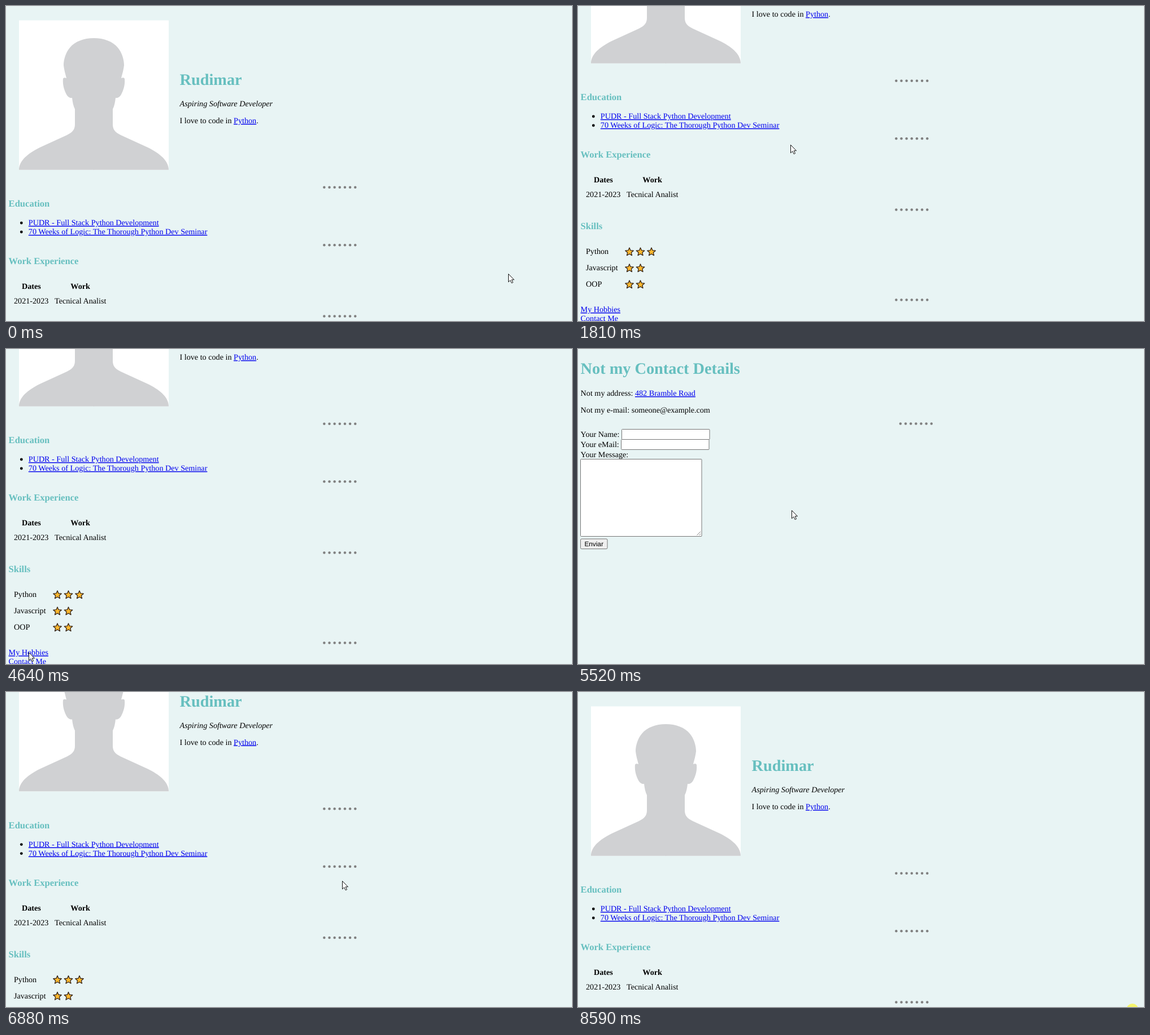
These frames come from a looping animation (1002 by 559 pixels, 8650 ms). An HTML page:

```html
<!DOCTYPE html>
<html lang="en">
<head>
<meta charset="utf-8">
<title>Personal site</title>
<style>
  html, body { margin: 0; width: 100%; height: 100%; overflow: hidden; background: #e8f4f4; }
  svg { display: block; width: 1002px; height: 559px; }
  text { font: 14.16px "Liberation Serif", "Times New Roman", serif; text-rendering: geometricPrecision; white-space: pre; }
  .h1 { font-size: 28.32px; font-weight: bold; fill: #66bfbf; }
  .h3 { font-size: 16.57px; font-weight: bold; fill: #66bfbf; }
  .b { font-weight: bold; }
  .i { font-style: italic; }
  .a { fill: #00e; text-decoration: underline; text-decoration-thickness: 1px; text-underline-offset: 1px; }
  .btn { font: 11.8px "Liberation Sans", Arial, sans-serif; }
  .field { fill: #fff; stroke: #767676; }
</style>
</head>
<body>
<svg viewBox="0 0 1002 559">
  <g id="home">
    <rect x="23" y="25.5" width="265" height="265.3" fill="#fff"/>
    <path id="half" fill="#d0d1d3" d="M156 57C137 57 122 63 113 74C106 82 102 95 102 105C103 114 105 120 107 128
      Q102 126 101 129C100 140 103 149 107 157Q111 164 117 163C118 171 119 177 122 183V210
      C122 219 118 224 108 229L60 251C38 262 23 275 23 290.7H156Z"/>
    <use href="#half" transform="matrix(-1 0 0 1 311 0)"/>
  </g>
  <g id="hobbies"></g>
  <g id="contact"></g>
  <circle id="mark" cx="981.5" cy="563.5" r="10.5" fill="#f6f66e"/>
  <path id="cursor" fill="#fff" stroke="#111" d="M.5 .5V14.8L3.8 11.7L6.2 16.7L8.5 15.6L6.2 10.8H10.5Z"/>
</svg>
<script>
const NS = "http://www.w3.org/2000/svg";
const $ = id => document.getElementById(id);
const pages = { home: $("home"), hobbies: $("hobbies"), contact: $("contact") };
const LEFT = 4.6, INDENT = 39.8, LINE = 16;

function add(parent, tag, attrs, text) {
  const el = document.createElementNS(NS, tag);
  for (const k in attrs) el.setAttribute(k, attrs[k]);
  if (text) el.textContent = text;
  parent.appendChild(el);
  return el;
}
const write = (page, x, y, text, cls = "") => add(page, "text", { x, y, class: cls }, text);
const span = (line, text, cls = "") => add(line, "tspan", { class: cls }, text);
const dot = (page, cx, cy, r, fill) => add(page, "circle", { cx, cy, r, fill });

function rule(page, cx, y) {
  for (let i = -3; i <= 3; i++) dot(page, cx + i * 9.15, y, 2.25, "#808080");
}

function star(page, cx, cy) {
  const pts = [];
  for (let i = 0; i < 10; i++) {
    const r = i % 2 ? 3.5 : 7.6, a = i * Math.PI / 5;
    pts.push(`${cx + r * Math.sin(a)},${cy + .5 - r * Math.cos(a)}`);
  }
  add(page, "polygon", { points: pts.join(" "), fill: "#ffb92e", stroke: "#33241a",
    "stroke-width": 1.3, "stroke-linejoin": "round" });
}

function buildHome(p) {
  write(p, 307.5, 140, "Rudimar", "h1");
  write(p, 307.5, 178, "Aspiring Software Developer", "i");
  const intro = write(p, 307.5, 208, "I love to code in ");
  span(intro, "Python", "a");
  span(intro, ".");
  [321.7, 424.3, 550.5, 710.5].forEach(y => rule(p, 590.8, y));

  write(p, LEFT, 356, "Education", "h3");
  ["PUDR - Full Stack Python Development",
   "70 Weeks of Logic: The Thorough Python Dev Seminar"].forEach((s, i) => {
    dot(p, 27.3, 385 + i * LINE, 2.4, "#000");
    write(p, INDENT, 389 + i * LINE, s, "a");
  });

  write(p, LEFT, 458, "Work Experience", "h3");
  write(p, 28, 502, "Dates", "b");
  write(p, 114.3, 502, "Work", "b");
  write(p, 14, 528, "2021-2023");
  write(p, 86, 528, "Tecnical Analist");

  write(p, LEFT, 585, "Skills", "h3");
  [["Python", 3], ["Javascript", 2], ["OOP", 2]].forEach(([name, n], row) => {
    const y = 625 + row * 29;
    write(p, 14, y + 4, name);
    for (let i = 0; i < n; i++) star(p, 91 + i * 19.5, y);
  });
  ["My Hobbies", "Contact Me"].forEach((s, i) => write(p, LEFT, 732 + i * LINE, s, "a"));
}

function buildHobbies(p) {
  write(p, LEFT, 32, "My Hobbies", "h3");
  ["Reading", "Study", "Games", "Series"].forEach((s, i) =>
    write(p, 25.7, 65 + i * LINE, `${i + 1}. ${s}`));
}

function buildContact(p) {
  const box = (x, y, width, height, extra) =>
    add(p, "rect", { x, y, width, height, rx: 1, class: "field", ...extra });
  write(p, LEFT, 44, "Not my Contact Details", "h1");
  span(write(p, LEFT, 83, "Not my address: "), "482 Bramble Road", "a");
  write(p, LEFT, 113, "Not my e-mail: someone@example.com");
  rule(p, 598.3, 132.5);
  ["Your Name:", "Your eMail:", "Your Message:"].forEach((s, i) => {
    write(p, LEFT, 156 + i * 18, s);
    if (i < 2) box(77.5 - i, 142.5 + i * 18, 155.5, 18);
  });
  box(4.5, 195.5, 214.5, 137);
  add(p, "path", { d: "M210.5 330.5L217 324M214.5 330.5L217 328", stroke: "#777", "stroke-width": .9 });
  box(4.5, 337, 47.5, 17.7, { rx: 2, style: "fill:#efefef" });
  write(p, 11.4, 350, "Enviar", "btn");
}

buildHome(pages.home);
buildHobbies(pages.hobbies);
buildContact(pages.contact);

const LOOP = 8650, FRAME = LOOP / 130, FLICK = 200;

function ease(u) {
  u = Math.min(Math.max(u, 0), 1);
  return u * u * (3 - 2 * u);
}

// Wheel flicks: start, distance
const flicks = [[890, 88.5], [1596, 100.5], [6764, -177], [7190, -12]];
const scrollAt = t => flicks.reduce((y, [start, d]) => y + d * ease((t - start) / FLICK), 0);

// Pointer glides: start, end, destination
const rest = [889, 475], back = [30, -30], links = [40, 538];
const glides = [
  [60, 270, [389, 237]],
  [900, 995, [384, 242]],
  [1640, 1790, [376, 246]],
  [1860, 2340, links],
  [2560, 3330, [244, 386]],
  [3380, 3525, [255, 313]],
  [3740, 4100, back],
  [4160, 4570, links],
  [4780, 5190, [378, 286]],
  [5540, 5780, [856, 410]],
  [5920, 6320, back],
  [6400, 6680, [595, 335]],
  [7250, 8040, [909, 570]]
];

function pointerAt(t) {
  return glides.reduce((pos, [start, end, to]) => {
    const u = ease((t - start) / (end - start));
    return pos.map((v, i) => v + (to[i] - v) * u);
  }, rest);
}

// Time, page opened
const visits = [[0, "home"], [2690, "hobbies"], [4150, "home"], [4790, "contact"], [6330, "home"]];

function draw(time) {
  const t = Math.floor((time + 5) / FRAME) * FRAME;
  const current = visits.findLast(v => v[0] <= t)[1];
  for (const name in pages) pages[name].style.display = name === current ? "" : "none";
  pages.home.setAttribute("transform", `translate(0 ${-scrollAt(t)})`);
  const [x, y] = pointerAt(t).map(Math.round);
  $("cursor").setAttribute("transform", `translate(${x} ${y})`);
  $("mark").style.display = time >= 8590 ? "" : "none";
}

const begin = performance.now();
function tick() {
  draw((performance.now() - begin) % LOOP);
  requestAnimationFrame(tick);
}
tick();
</script>
</body>
</html>
```
